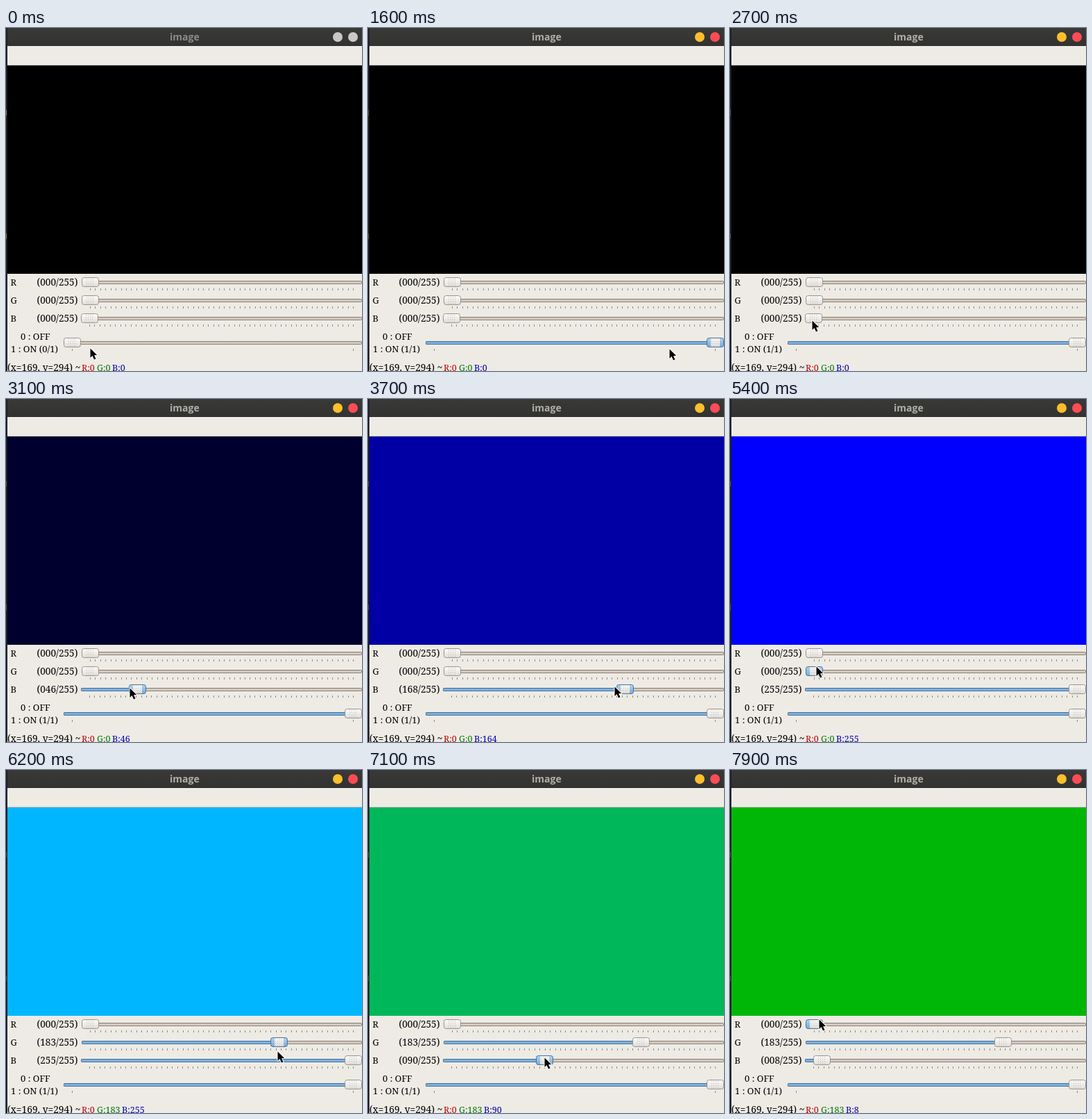
Write an HTML page with a canvas that moves like this. It is 513 px wide and 494 px high and loops after 8000 ms.

```html
<!DOCTYPE html>
<html lang="en">
<head>
<meta charset="utf-8">
<title>image</title>
<style>
html, body { margin: 0; width: 100%; height: 100%; overflow: hidden; background: #eeebe5; }
canvas { display: block; }
</style>
</head>
<body>
<canvas id="stage" width="513" height="494"></canvas>
<script>
const c = document.getElementById('stage').getContext('2d');
const LOOP = 80; // ticks of 100 ms
const SERIF = '"Noto Serif", serif';

// Pointer moves: from tick, to tick, x, y, slider under the pointer on arrival.
const moves = [
  [0, 0, 121, 461, ''],
  [1, 5, 97, 450, 'S'],
  [10, 14, 420, 459, 'S'],
  [15, 16, 434, 462, 'S'],
  [20, 23, 92, 443, ''],
  [24, 28, 126, 414, 'B'],
  [29, 31, 178, 416, 'B'],
  [31, 38, 384, 414, 'B'],
  [41, 45, 496, 414, 'B'],
  [48, 53, 122, 387, 'G'],
  [53, 54, 124, 385, 'G'],
  [54, 62, 391, 405, 'G'],
  [62, 65, 499, 414, 'B'],
  [65, 74, 132, 414, 'B'],
  [76, 79, 128, 359, 'R']
];

// Progress from tick a to tick b, 0 to 1.
const ramp = (t, a, b) => t < b ? Math.max(0, (t - a) / (b - a)) : 1;

const green = t => Math.round(183 * ramp(t, 54, 62));

// The picture trails the slider, so its first drag ends later.
const blue = (t, dragEnd) => Math.round(
  46 * ramp(t, 29, 31) + 145 * ramp(t, 31, dragEnd) + 64 * ramp(t, 41, 45) - 247 * ramp(t, 65, 74));

function pointer(t) {
  let x = 0, y = 0, over = '';
  for (const [from, to, nextX, nextY, target] of moves) {
    if (t < from || (t === from && to > from)) break;
    const p = ramp(t, from, to);
    x += (nextX - x) * p;
    y += (nextY - y) * p;
    over = p === 1 || over === target ? target : '';
  }
  return { x: Math.round(x), y: Math.round(y), over };
}

function rect(x, y, w, h, color) {
  c.fillStyle = color;
  c.fillRect(x, y, w, h);
}

function text(str, x, y, size = 13, color = '#000') {
  c.font = `${size}px ${SERIF}`;
  c.fillStyle = color;
  c.fillText(str, x, y);
}

function disc(x, y, color) {
  c.fillStyle = color;
  c.beginPath();
  c.arc(x, y, 7, 0, 7);
  c.fill();
}

function shade(y, h, top, bottom) {
  const g = c.createLinearGradient(0, y, 0, y + h);
  g.addColorStop(0, top);
  g.addColorStop(1, bottom);
  return g;
}

function box(x, y, w, h, r, fill, stroke) {
  c.beginPath();
  c.roundRect(x + .5, y + .5, w - 1, h - 1, r);
  c.fillStyle = fill;
  c.fill();
  c.strokeStyle = stroke;
  c.lineWidth = 1;
  c.stroke();
}

function slider(left, y, value, max, step, active) {
  const place = v => Math.round(left + 12 + v / max * (488 - left));
  for (let v = 0; v <= max; v += step) rect(place(v), y + 9, 1, 3, '#8f8a82');

  const x = place(value) - 12;
  box(left, y - 2, 513 - left, 5, 1, shade(y - 2, 5, '#c9beb1', '#ddd4c9'), '#8b8177');
  if (value > 0) box(left, y - 2, x + 12 - left, 5, 1, shade(y - 2, 5, '#6fa3d4', '#8fbce5'), '#44719c');

  const face = shade(y - 7, 14, '#fdfdfc', '#dfdcd7');
  if (active) {
    box(x, y - 7, 25, 14, 3, shade(y - 7, 14, '#b5d4ef', '#74a8d8'), '#44719c');
    rect(x + 6, y - 6, 13, 12, face);
  } else {
    box(x, y - 7, 25, 14, 3, face, '#99938b');
  }
  for (let i = 0; i < 4; i++)
    for (let j = 0; j < 4; j++) rect(x + 7 + i * 3, y - 5 + j * 3, 1, 1, '#bdb8b0');
}

function arrow(x, y) {
  c.beginPath();
  [[0, 0], [0, 13.5], [3, 10.6], [5.5, 16], [8, 15], [5.6, 9.8], [9.7, 9.5]]
    .forEach(([dx, dy]) => c.lineTo(x + dx + .5, y + dy + .5));
  c.closePath();
  c.lineJoin = 'round';
  c.strokeStyle = '#fff';
  c.lineWidth = 2;
  c.stroke();
  c.fillStyle = '#000';
  c.fill();
}

function drawWindow(focused) {
  rect(0, 0, 513, 494, '#eeebe5');
  rect(0, 0, 2, 494, '#1d1e29');
  for (const y of [118, 296]) rect(0, y, 1, 8, focused ? '#59492f' : '#a0702f');
  rect(2, 0, 511, 26, shade(0, 26, '#393938', '#323231'));
  rect(2, 26, 511, 1, '#f8f7f4');
  rect(2, 53, 511, 1, '#bcb8b0');
  c.font = 'bold 14px "Open Sans", sans-serif';
  c.fillStyle = focused ? '#b2afa8' : '#8b8b89';
  c.fillText('image', 236, 18);
  disc(478, 13, focused ? '#fcbf2d' : '#c9c8c6');
  disc(500, 13, focused ? '#fb4c55' : '#c9c8c6');
}

function draw(t) {
  const on = t >= 13 ? 1 : 0;
  const g = green(t), b = blue(t, 38.13), seen = blue(t, 38.37);
  const { x, y, over } = pointer(t);

  drawWindow(t >= 7);
  rect(2, 54, 511, 300, `rgb(0,${g},${seen})`);

  [['R', 0, 109], ['G', g, 109], ['B', b, 108]].forEach(([name, value, left], i) => {
    const row = 366 + 26 * i;
    text(name, 6.5, row + 5);
    text(`(${String(value).padStart(3, '0')}/255)`, 44.5, row + 5, 13.6);
    slider(left, row, value, 255, 5, over === name);
  });
  text('0 : OFF', 21, 449);
  text(`1 : ON (${on}/1)`, 7, 467);
  slider(83, 453, on, 1, 1, over === 'S');

  text('(x=169, y=294) ~', 2, 494, 13.8);
  text('R:0', 109, 494, 12.5, '#c80000');
  text('G:' + g, 131, 494, 12.5, '#007800');
  text('B:' + seen, 146 + 7 * String(g).length, 494, 12.5, '#0000b4');
  arrow(x, y);
}

function frame() {
  draw(Math.floor(performance.now() / 100) % LOOP);
  requestAnimationFrame(frame);
}
frame();
</script>
</body>
</html>
```
